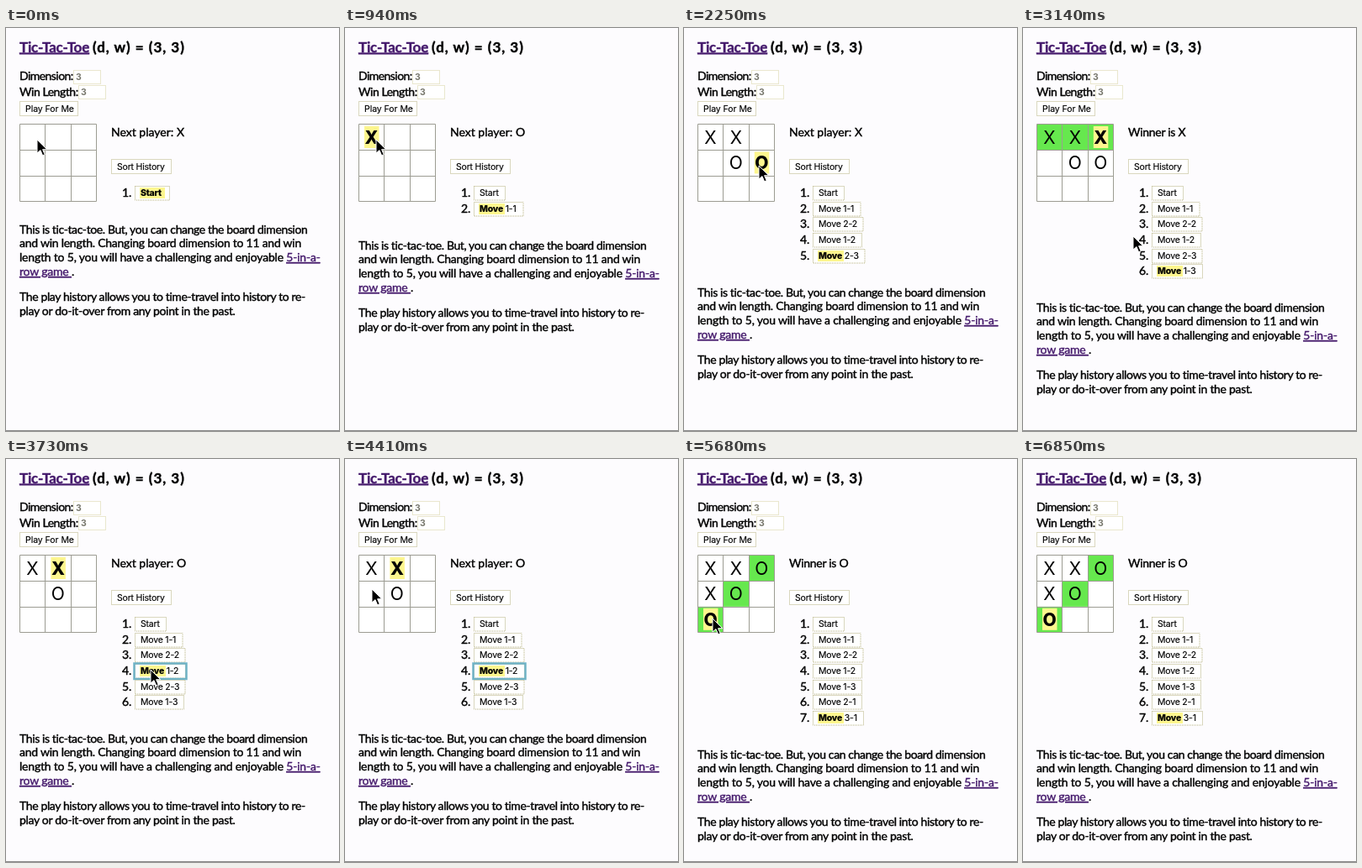
These frames come from a looping animation (396x480 px, 6.95 s). An HTML page:

```html
<!DOCTYPE html>
<html lang="en">
<head>
<meta charset="utf-8">
<title>Tic-Tac-Toe</title>
<style>
  html, body { margin: 0; width: 100%; height: 100%; overflow: hidden; background: #fdfcfe; }
  svg { display: block; }
  text { font: 14px Lato, sans-serif; stroke: #000; stroke-width: .4px; white-space: pre; }
  .title { font-size: 17px; font-weight: 700; }
  .link { fill: #451a6c; stroke: #451a6c; text-decoration: underline; }
  .ui { font: 10.5px Inter, sans-serif; letter-spacing: -.2px; stroke-width: .15px; }
  .piece { font: 21px Inter, sans-serif; text-anchor: middle; stroke: none; }
  .bold { font-weight: 800; }
  .value { font: 700 10.5px Inter, sans-serif; fill: #77776c; stroke: none; }
  .paper { fill: #fff; }
  .button { fill: #fff; stroke: #b4b07c; stroke-dasharray: 1 1; }
  .field { fill: #fff; stroke: #d5d19c; stroke-dasharray: 1 1; }
  .mark { fill: #fdf68e; }
  .win { fill: #66e84e; }
  .ring { fill: none; stroke: #6fb3c6; stroke-width: 2.5; }
  .grid { fill: none; stroke: #9c9c92; }
</style>
</head>
<body>
<svg width="396" height="480" viewBox="0 0 396 480">
  <g id="page"></g>
  <path d="M0 479.5H396" stroke="#8a8a8a"/>
  <path id="cursor" d="M0 0V16L4 12.6L6.6 18.8L9.2 17.7L6.6 11.7H11.8Z" stroke="#fff" stroke-width="1"/>
</svg>
<script>
const LOOP = 6950, ROW = 18.65, CELL = 30.4, HIDE = 6620;
const page = document.getElementById('page');
const cursor = document.getElementById('cursor');

const opening = ['1-1', '2-2', '1-2', '2-3', '1-3'];
const retry = [...opening.slice(0, 3), '1-3', '2-1', '3-1'];

// time, moves, moves listed, current move, focused button
const steps = [
  [0, opening, 0, 0], [800, opening, 1, 1], [1500, opening, 2, 2],
  [1900, opening, 3, 3], [2210, opening, 4, 4], [2600, opening, 5, 5],
  [3560, opening, 5, 3, true],
  [4800, retry, 4, 4], [5200, retry, 5, 5], [5560, retry, 6, 6]
];

// time, x, y of the pointer tip
const path = [
  [0, 37, 133], [1100, 37, 133], [1460, 65, 162], [1660, 65, 162],
  [1860, 62, 134], [1940, 62, 134], [2170, 89, 164], [2290, 89, 164],
  [2540, 91, 134], [2740, 91, 134], [3140, 131, 248], [3440, 172, 251],
  [3900, 172, 251], [4390, 32, 155], [4440, 32, 155], [4740, 90, 133],
  [4880, 90, 133], [5140, 32, 160], [5280, 32, 160], [5520, 34, 190], [HIDE, 34, 190]
];

const lines = [
  [0, 1, 2], [3, 4, 5], [6, 7, 8], [0, 3, 6],
  [1, 4, 7], [2, 5, 8], [0, 4, 8], [2, 4, 6]
];

const text = (x, y, s, cls = '', gap = 0) =>
  `<text x="${x}" y="${y}" class="${cls}"${gap ? ` style="letter-spacing:${gap}px"` : ''}>${s}</text>`;
const rect = (x, y, w, h, cls) =>
  `<rect x="${x}" y="${y}" width="${w}" height="${h}" class="${cls}"/>`;
const link = s => `<tspan class="link">${s}</tspan>`;
const button = (x, y, w, s, gap) =>
  rect(x + .5, y + .5, w, 17, 'button') + text(x + 7, y + 12.5, s, 'ui', gap);

function header() {
  return text(16, 28.5, link('Tic-Tac-Toe'), 'title', -.2) +
    text(103, 28.5, '(d, w) = (3, 3)', 'title', 1) +
    text(16, 62, 'Dimension:', '', -.55) + rect(80.5, 50.5, 32, 16, 'field') + text(83, 62, '3', 'value') +
    text(16, 80.5, 'Win Length:', '', -.45) + rect(86.5, 68.5, 32, 16, 'field') + text(89, 80, '3', 'value') +
    button(16, 87, 69, 'Play For Me', -.05) + button(125, 156, 71, 'Sort History');
}

function board(moves) {
  const cells = Array(9).fill('');
  const place = m => (m[0] - 1) * 3 + (m[2] - 1);
  moves.forEach((m, i) => cells[place(m)] = i % 2 ? 'O' : 'X');
  const won = lines.find(l => cells[l[0]] && l.every(i => cells[i] === cells[l[0]]));
  const last = moves.length ? place(moves[moves.length - 1]) : -1;
  let out = rect(16.5, 115.5, 91, 91, 'paper');
  cells.forEach((mark, i) => {
    const x = 16.5 + i % 3 * CELL, y = 115 + Math.floor(i / 3) * CELL;
    if (won && won.includes(i)) out += rect(x, y, CELL, CELL, 'win');
    if (i === last) out += rect(x + 6.5, y + 2, 17.5, 26, 'mark');
    if (mark) out += text(x + 15, y + 23, mark, i === last ? 'piece bold' : 'piece');
  });
  out += '<path class="grid" d="M16.5 114.5h91v92h-91zM46.5 114.5v92M77.5 114.5v92M16.5 145.5h91M16.5 176.5h91"/>';
  const status = won ? 'Winner is ' + cells[won[0]] : 'Next player: ' + 'XO'[moves.length % 2];
  return out + text(125, 129, status, '', won ? -.28 : 0);
}

function history(moves, shown, current, focus) {
  let out = '';
  for (let i = 0; i <= shown; i++) {
    const y = Math.round(188 + i * ROW), on = i === current;
    const name = i ? 'Move' : 'Start';
    const wide = i ? moves[i - 1].replace(/[1-]/g, '').length : 0;
    const w = (i ? 56.5 + wide * 1.5 : 37) + (on ? (i ? 2 : 4) : 0);
    out += text(138, y + 12.5, i + 1 + '.') + rect(153.5, y + .5, w, 16.5, 'button');
    if (on) out += rect(159, y + 2, i ? 31 : 30, 13, 'mark');
    if (on && focus) out += rect(152.5, y - .5, w + 2, 18.5, 'ring');
    out += text(160, y + 12.3, `<tspan class="${on ? 'bold' : ''}">${name}</tspan>${i ? ' ' + moves[i - 1] : ''}`, 'ui');
  }
  return out;
}

function notes(shown) {
  return `<g transform="translate(0 ${Math.round(shown * ROW)})">` +
    text(16, 244.5, 'This is tic-tac-toe. But, you can change the board dimension', '', -.39) +
    text(16, 261, 'and win length. Changing board dimension to 11 and win', '', -.25) +
    text(16, 278, 'length to 5, you will have a challenging and enjoyable ' + link('5-in-a-'), '', -.2) +
    text(16, 295, link('row game ') + '.', '', -.2) +
    text(16, 325, 'The play history allows you to time-travel into history to re-', '', -.38) +
    text(16, 341.5, 'play or do-it-over from any point in the past.', '', -.31) + '</g>';
}

function movePointer(t) {
  const k = path.findIndex(p => p[0] > t);
  cursor.style.display = k < 0 ? 'none' : '';
  if (k < 0) return;
  const [t0, x0, y0] = path[k - 1], [t1, x1, y1] = path[k];
  const u = (t - t0) / (t1 - t0), e = u * u * (3 - 2 * u);
  cursor.setAttribute('transform', `translate(${x0 + (x1 - x0) * e} ${y0 + (y1 - y0) * e})`);
}

let drawn;
const start = performance.now();
function frame() {
  const t = (performance.now() - start) % LOOP;
  const step = steps.filter(s => s[0] <= t).pop();
  if (step !== drawn) {
    const [, moves, shown, current, focus] = drawn = step;
    page.innerHTML = header() + board(moves.slice(0, current)) +
      history(moves, shown, current, focus) + notes(shown);
  }
  movePointer(t);
  requestAnimationFrame(frame);
}
frame();
</script>
</body>
</html>
```
